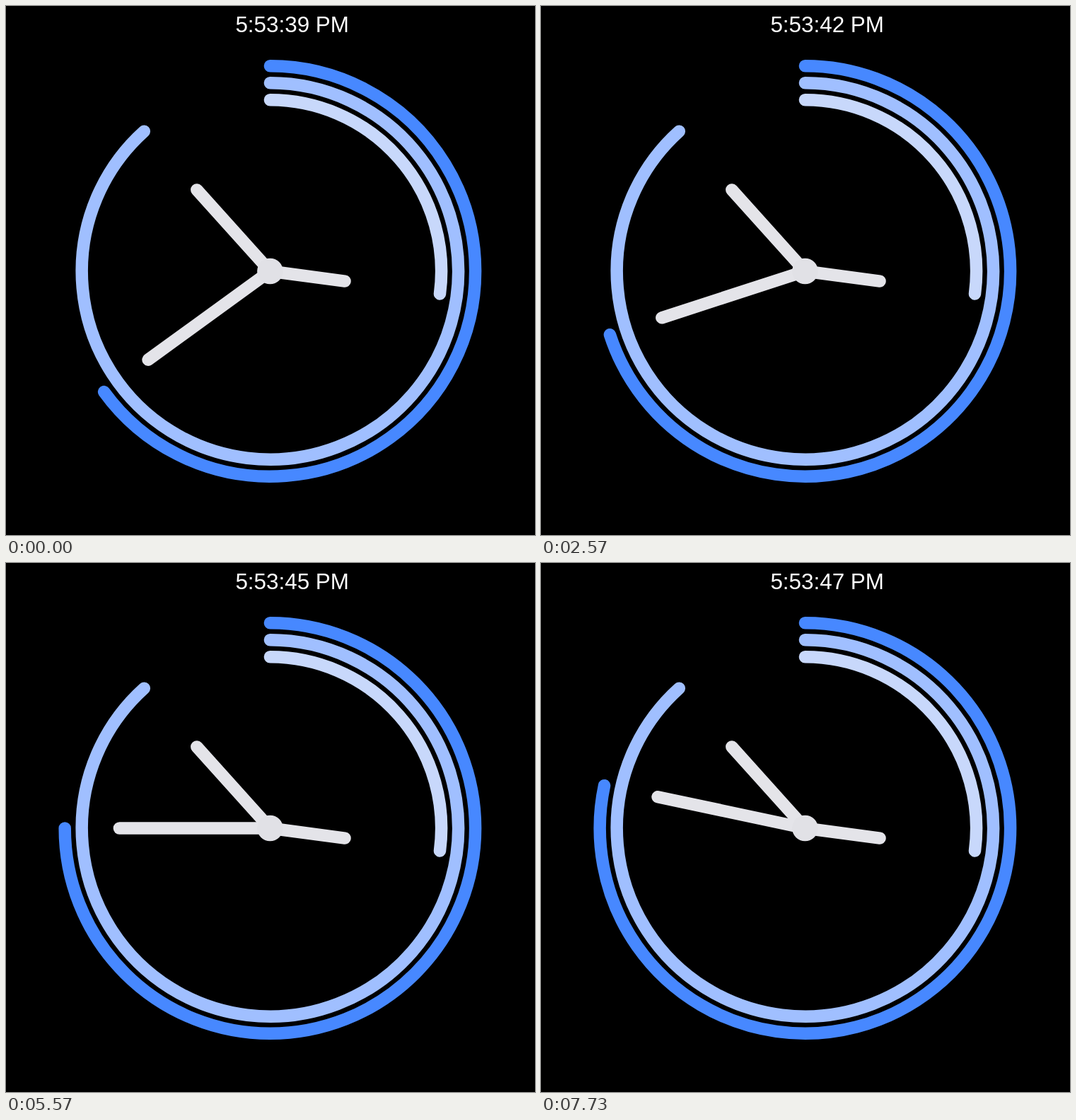
Animation of 748 by 748 pixels, one loop 8 s. Source, as an HTML page:

```html
<!DOCTYPE html>
<html>
<head>
<meta charset="utf-8">
<style>
html, body { margin: 0; width: 100%; height: 100%; overflow: hidden; background: #000; }
svg { display: block; width: 100vw; height: 100vh; }
path { fill: none; stroke-width: 17.5; stroke-linecap: round; }
text { font: 31.4px "Liberation Sans", Arial, sans-serif; fill: #fff; }
</style>
</head>
<body>
<svg viewBox="0 0 748 748">
  <text id="time" x="324.4" y="37"></text>
  <g id="dial"></g>
  <circle cx="373.4" cy="375" r="18.3" fill="#e1e1e6"/>
</svg>
<script>
const CX = 373.4, CY = 375, LOOP = 8000;
const HOUR_ANGLE = 97.6, MINUTE = 53, FIRST_SECOND = 39;
const dial = document.getElementById('dial');
const label = document.getElementById('time');

// Degrees run clockwise from twelve o'clock.
function point(radius, deg) {
  const a = deg * Math.PI / 180;
  return `${CX + radius * Math.sin(a)} ${CY - radius * Math.cos(a)}`;
}

function arc(radius, deg) {
  const large = deg > 180 ? 1 : 0;
  return `M${point(radius, 0)}A${radius} ${radius} 0 ${large} 1 ${point(radius, deg)}`;
}

const hand = (length, deg) => `M${CX} ${CY}L${point(length, deg)}`;

function addPath(color) {
  const path = document.createElementNS('http://www.w3.org/2000/svg', 'path');
  path.setAttribute('stroke', color);
  dial.append(path);
  return d => path.setAttribute('d', d);
}

const HAND = '#e4e4e9';
const secondArc = addPath('#4788ff');
addPath('#a0bfff')(arc(266.2, MINUTE * 6));
addPath('#c8d8fb')(arc(242.2, HOUR_ANGLE));
const secondHand = addPath(HAND);
addPath(HAND)(hand(154.8, MINUTE * 6));
addPath(HAND)(hand(106.6, HOUR_ANGLE));

let shown;
function draw(now) {
  const second = FIRST_SECOND + Math.floor((now % LOOP + 430) / 1000);
  if (second !== shown) {
    shown = second;
    label.textContent = `5:${MINUTE}:${second} PM`;
    secondArc(arc(290.2, second * 6));
    secondHand(hand(213, second * 6));
  }
}

const start = performance.now();
function tick() {
  draw(performance.now() - start);
  requestAnimationFrame(tick);
}
tick();
</script>
</body>
</html>
```
